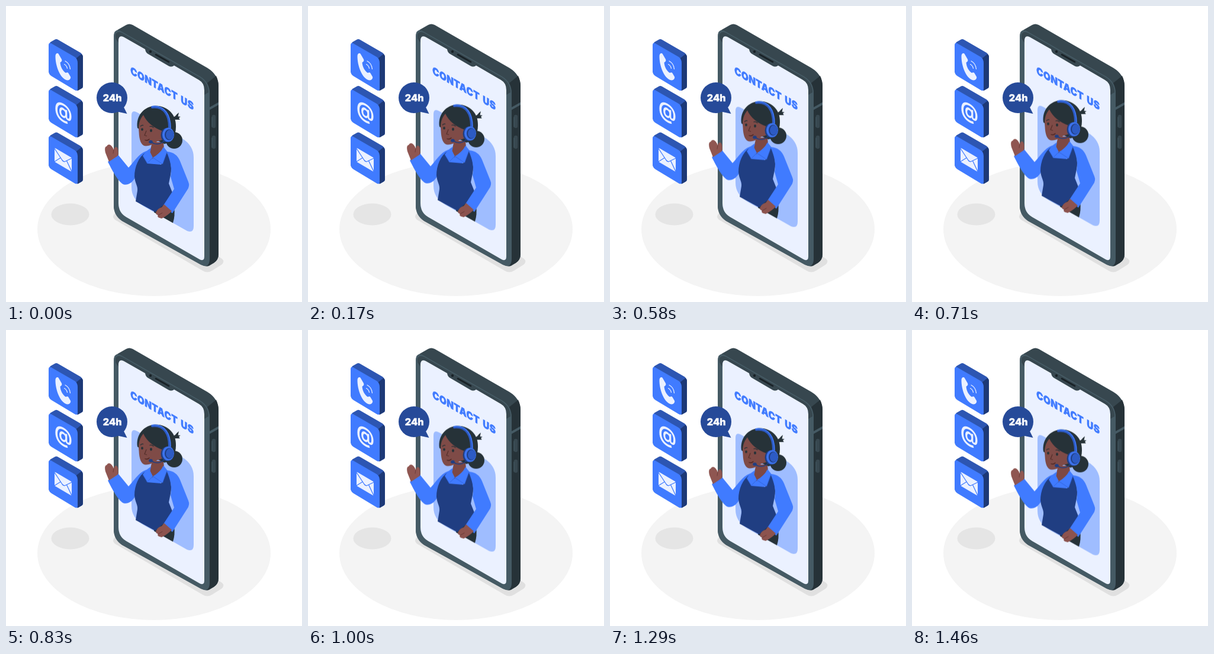
An HTML page for the animation above (1.5 s loop, 500 by 500 pixels).

```html
<!DOCTYPE html>
<html lang="en">
<head>
<meta charset="utf-8">
<title>Contact us</title>
<style>
  html, body { margin: 0; width: 100%; height: 100%; overflow: hidden; background: #fff; }
  svg { display: block; width: 100vw; height: 100vh; }
  text { font-family: Inter, "Open Sans", sans-serif; }
  .line { fill: none; stroke-linecap: round; stroke-linejoin: round; }
  #agent { animation: float 1500ms linear infinite; }
  @keyframes float {
    0%, 100% { transform: translateY(0); }
    50% { transform: translateY(-10px); }
  }
</style>
</head>
<body>
<svg viewBox="0 0 500 500">
  <defs>
    <g id="tile">
      <path fill="#2d56b2" d="M72 68Q72 64 75 61L82 57Q85 55 88 57L126 79Q130 82 130 87V135Q130 138 128 139L121 143L76 117Q72 115 72 108Z"/>
      <path fill="#1d3977" d="M119 88L127.500 81Q130 83 130 87V135Q130 138 128 139L121 143Z"/>
      <path fill="#407bff" d="M72 67Q72 60.500 77 63.500L116 86Q121 89.500 121 96V139Q121 145 116 142L77 118.500Q72 115.500 72 109Z"/>
    </g>
  </defs>

  <!-- Floor -->
  <ellipse cx="250" cy="377" rx="197" ry="113" fill="#f4f4f4"/>
  <ellipse cx="108.500" cy="352" rx="32" ry="18.500" fill="#e5e5e5"/>
  <path fill="#e0e0e0" d="M184 361Q178 356 184 350L200 341L352 419L365 427Q370 432 364 437L348 447Q340 452 332 447Z"/>

  <!-- Tiles -->
  <use href="#tile"/>
  <use href="#tile" y="79"/>
  <use href="#tile" y="157.500"/>
  <path fill="#ebf1ff" d="M83.500 84C84 79.500 87 79 88.500 80.500L94 90C95 92.500 94 94 91.500 95.500C92 103 96 110 101 113C103 112 104.500 112 105.500 113.500L109 119.500C110 122 107.500 125.500 104 125.500C92 124 83 101 83.500 84Z"/>
  <g class="line" stroke="#ebf1ff" stroke-width="1.200">
    <path d="M98.500 98.500Q102.500 100.500 103.500 105.500"/>
    <path d="M100 93Q107.500 97 108.500 106.500"/>
  </g>
  <text transform="matrix(.866 .5 0 1 97 189.500)" font-size="34" font-weight="700" text-anchor="middle" fill="#ebf1ff">@</text>
  <path fill="#ebf1ff" d="M82 241.500Q82 239.500 84 240.500L109.500 255.500Q111 256.500 111 258V278Q111 280 109 279L83.500 264Q82 263 82 261.500Z"/>
  <path class="line" stroke="#407bff" stroke-width="1.300" d="M82.500 241.500L95 260.500Q97.500 264 100 262.500L110.500 257.500M82.500 262.500L92 256.500M110.500 278.500L102.500 261.500"/>

  <!-- Phone -->
  <path fill="#37474f" d="M182 52Q182 44 189 40L203 32Q208 29 214 32L340 104.500Q359 116 359 136V419Q359 429 351 434L343 439Q337 441 330 437L196 363Q182 353 182 336Z"/>
  <path fill="#263238" d="M340 130L355 118Q359 126 359 136V419Q359 429 351 434L340 439.500L344 425V145Z"/>
  <path fill="#455a64" d="M182 52Q182 36 196 43.500L328 119Q344 129 344 147V427Q344 444 329 437L196 363Q182 354 182 337Z"/>
  <path fill="#37474f" d="M185 55Q183 40 196 45.500L327 120.500Q342 130 342 146L335 150L190 62Z"/>
  <path fill="#ebf1ff" d="M190 59Q190 48 199 52.500L235 73Q236 79 240 81L275 101.500Q280 104 284 100.500L326 125Q335 130 335 142V423Q335 432 327 428L203 356.500Q190 349 190 333Z"/>
  <circle cx="244" cy="77" r="2.200" fill="#192227"/>
  <path class="line" stroke="#192227" stroke-width="2.600" d="M253 82L275 94.500"/>
  <path fill="#455a64" d="M344 171L359 162.500V167L344 175.500Z"/>
  <g class="line" stroke-width="6.500" stroke="#37474f">
    <path d="M351 187V203M351 222V238"/>
    <path stroke="#455a64" stroke-width="1" d="M348 188V204M348 223V239"/>
  </g>
  <text transform="matrix(.866 .5 0 1 210.300 114.500)" font-size="17.600" font-weight="900" letter-spacing=".45" word-spacing="2" fill="#407bff" stroke="#407bff" stroke-width=".5">CONTACT US</text>

  <!-- Bubble -->
  <path fill="#264a99" d="M186 178L204.500 182L198 169Z"/>
  <circle cx="179" cy="155" r="26" fill="#264a99"/>
  <text x="179.700" y="161.300" font-size="16.300" font-weight="800" text-anchor="middle" fill="#fff" stroke="#fff" stroke-width=".5">24h</text>

  <g id="agent">
    <path fill="#9fbdff" d="M212 185Q212 174 222 180L298 224Q317 236 317 256V372Q317 384 306 380L232 338Q212 326 212 306Z"/>

    <!-- Body -->
    <path fill="#263238" d="M252 328L284 340Q286 354 282 366.500L250 348.500Z"/>
    <path fill="#407bff" d="M172 263L189 251L207 273C215 265 223 250 237 245L230 270L218 290C213 299 206 303 199 301.500C190 298 179 277 172 263Z"/>
    <path fill="#407bff" d="M236 246L266 238L274 248L260 270L236 268Z"/>
    <path fill="#203e82" d="M236 247C224 255 217 272 217 288C218 300 223 304 222 312L219 330L252 348L260 341L270 333L281 315L275 300L277 290C281 275 279 262 272 246L262 268L238 266Z"/>
    <path fill="#407bff" d="M268 242L272 246C283 247 290 252 294 262L308 297Q311 304 306 311L281 350L265 338L284 309L278 288C281 275 278 262 271 246Z"/>
    <path fill="#8c534e" d="M267 335L280 346.500Q273 354 263 359L258 357.500Q255 355.500 257 353.500Q252 352 253.500 348Q256 342 263 340Z"/>
    <path class="line" stroke="#5d322e" stroke-width=".8" d="M257 353.500L264 349.500"/>
    <path fill="#8f5651" d="M174 263L168 248Q165.500 238 170 237Q172 233 176 234.500Q180 237 182 243Q183 237 187 238.500Q190 241 189.500 250L189 253Z"/>
    <path class="line" stroke="#5d322e" stroke-width=".7" d="M182 243L181 249"/>

    <!-- Neck and collar -->
    <path fill="#7d4844" d="M247 230H266L267 241L247.500 258L243 246Z"/>
    <path fill="#407bff" d="M236 246L245 239.500L243.500 247L248 256L238.500 265.500L231 253Z"/>
    <path fill="#407bff" d="M266 238L272 246L264.500 267L248 256Q260 250 266 238Z"/>
    <path class="line" stroke="#2f63d8" stroke-width=".8" d="M231 253L238.500 265.500L248 256L264.500 267L272 247"/>

    <!-- Head -->
    <circle cx="284" cy="227" r="14" fill="#263238"/>
    <path fill="#263238" d="M279 190L286 186Q288 183 292 180L290.500 186.500L295 187Q290 189 294 192Q288 192 284 192Z"/>
    <path fill="#263238" d="M222 206C219 186 233 169 253 168.500C274 169 288 184 287 204C287 219 280 230 268 233L252 226Z"/>
    <path fill="#7f4b47" d="M232 184C226 191 223 200 224.500 213C225 226 228 236 236 236.500C244 236 250 233 255 229L264 226V211C250 206 238 197 232 184Z"/>
    <g fill="#263238">
      <ellipse cx="230" cy="208.500" rx="1.900" ry="2.300"/>
      <ellipse cx="245" cy="210.500" rx="2" ry="2.400"/>
    </g>
    <g class="line" stroke="#263238" stroke-width="1.300">
      <path d="M227.500 203Q229 201 231.500 201.500M243 203.500Q246 202.500 249 205"/>
      <path stroke="#56302c" d="M237 211L234 218.500L237.500 219.500"/>
      <path stroke="#4b2522" d="M235 226.500Q239 228 242 225"/>
    </g>

    <!-- Headset -->
    <path class="line" stroke="#2d5bc4" stroke-width="4" d="M247 171C268 168.500 276.500 186 276 206"/>
    <path class="line" stroke="#407bff" stroke-width="1.500" d="M247 169.500C269 167 278 185 278 206"/>
    <path class="line" stroke="#203e82" stroke-width="1.500" d="M268 227C262 234 253 235 245 230"/>
    <ellipse cx="244.500" cy="229.500" rx="3.300" ry="2.700" fill="#203e82"/>
    <ellipse cx="271" cy="218" rx="9.500" ry="12" fill="#203e82"/>
    <ellipse cx="274" cy="217.500" rx="10" ry="12" fill="#3c73ee"/>
    <ellipse cx="275.500" cy="217.500" rx="7.500" ry="9.300" fill="#203e82"/>
    <ellipse cx="276.500" cy="217.500" rx="6.500" ry="8.300" fill="#2d5bc4"/>
  </g>
</svg>
</body>
</html>
```
